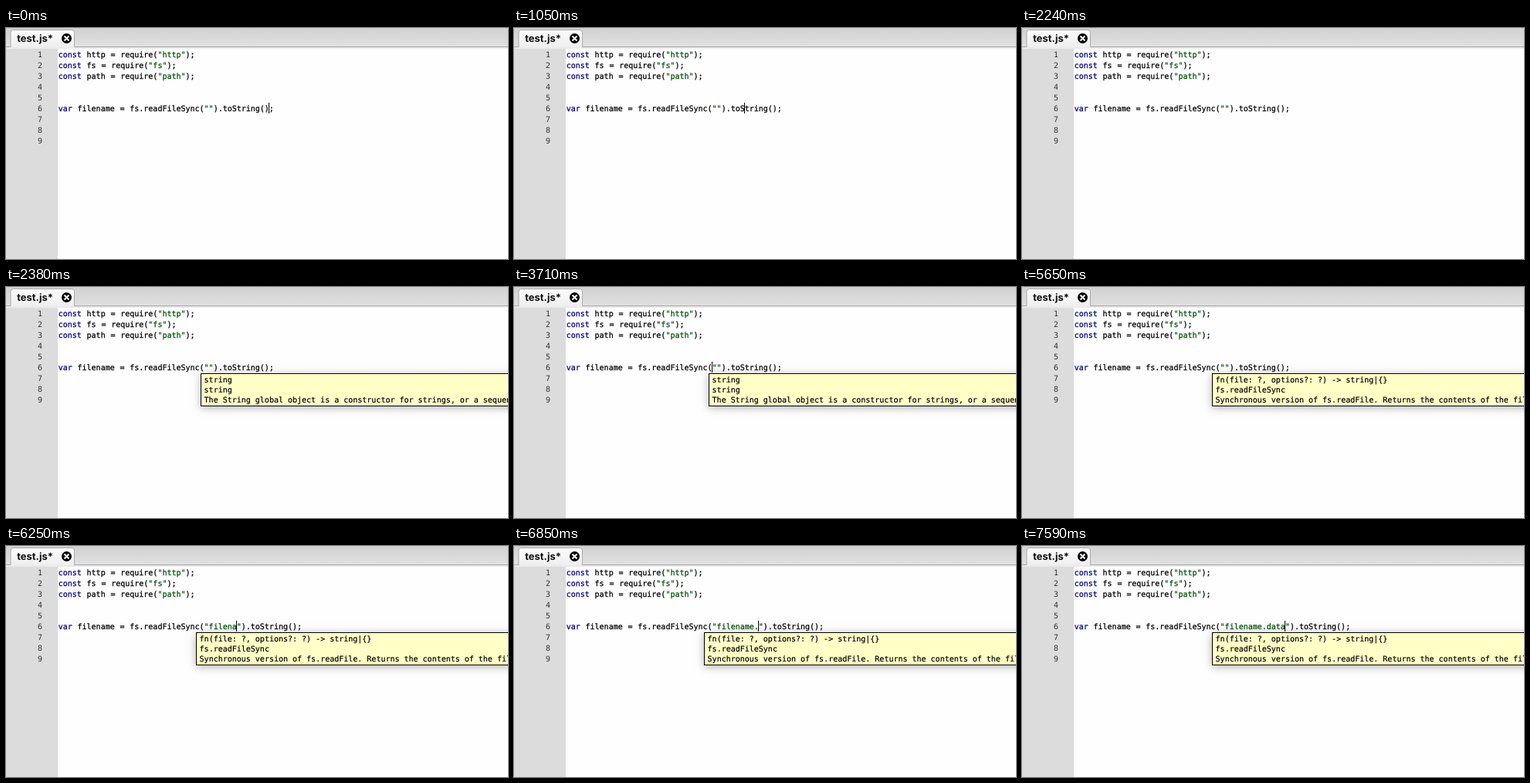
Write an HTML page with a canvas that moves like this. It is 650x300 px and loops after 8000 ms.

```html
<!DOCTYPE html>
<html lang="en">
<head>
<meta charset="utf-8">
<title>Code editor</title>
<style>
  html, body { margin: 0; width: 100%; height: 100%; overflow: hidden; background: #fff; }
  canvas { display: block; }
</style>
</head>
<body>
<canvas id="stage" width="650" height="300"></canvas>
<script>
const ctx = document.getElementById("stage").getContext("2d");
const W = 650, H = 300, LOOP = 8000;
const MONO = '10px "DejaVu Sans Mono", monospace';
const LABEL = 'bold 13px Inter, "Liberation Sans", sans-serif';
const CODE_X = 67.7, TOP = 27, ROW = 14;
const STEP = 150, BLINK = 440, START_COL = 45;
const TYPED = "filename.data", TYPE_AT = 5200, TYPE_COL = 32;

const CODE = [
  'const http = require("http");',
  'const fs = require("fs");',
  'const path = require("path");'
];

const STRING_TIP = {
  x: 252, at: 2380,
  lines: ["string", "string",
    "The String global object is a constructor for strings, or a sequence of characters."]
};
const READ_TIP = {
  x: 246, at: 4160,
  lines: ["fn(file: ?, options?: ?) -> string|{}", "fs.readFileSync",
    "Synchronous version of fs.readFile. Returns the contents of the filename."]
};

// Bursts of caret movement: start time, steps, columns covered
const BURSTS = [
  [450, 6, -11], [1340, 3, -3], [3710, 1, -1],
  [4750, 1, 1], [5050, 1, 1],
  [5650, 4, 6], [6250, 2, 2], [6700, 1, 1], [7290, 2, 4]
];

const clamp = (v, lo, hi) => Math.min(hi, Math.max(lo, v));

// The blink clock stands still while the first tooltip loads.
const blinkClock = t => t - clamp(t - STRING_TIP.at + 140, 0, 140);

function caretAt(t) {
  let col = START_COL, moved = 0;
  for (const [start, steps, cols] of BURSTS) {
    const k = clamp(Math.floor((t - start) / STEP), 0, steps);
    col += Math.round(cols * k / steps);
    if (k) moved = start + k * STEP;
  }
  const idle = blinkClock(t) - blinkClock(moved);
  return { col, visible: Math.floor(idle / BLINK) % 2 === 0 };
}

function rect(x, y, w, h, color) {
  ctx.fillStyle = color;
  ctx.fillRect(x, y, w, h);
}

function fade(h, from, to) {
  const g = ctx.createLinearGradient(0, 0, 0, h);
  g.addColorStop(0, from);
  g.addColorStop(1, to);
  return g;
}

function setFont(font, gap = 0) {
  ctx.font = font;
  ctx.textRendering = "geometricPrecision";
  ctx.wordSpacing = gap + "px";
}

function text(str, x, y, color, weight = 0) {
  ctx.fillStyle = ctx.strokeStyle = color;
  ctx.fillText(str, x, y);
  if (weight) {
    ctx.lineWidth = weight;
    ctx.strokeText(str, x, y);
  }
}

const codeX = (line, col) => CODE_X + ctx.measureText(line.slice(0, col)).width;

function codeLine(line, row) {
  setFont(MONO, 0.75);
  for (const m of line.matchAll(/"[^"]*"|\b(?:const|var)\b|[^\s"]+/g)) {
    const token = m[0];
    const color = token[0] === '"' ? "#00500a"
      : /^(const|var)$/.test(token) ? "#000080" : "#000";
    text(token, codeX(line, m.index), TOP + row * ROW + 11, color, 0.25);
  }
}

function tab() {
  ctx.beginPath();
  ctx.moveTo(6, 25);
  ctx.lineTo(6, 6);
  ctx.quadraticCurveTo(6, 2.5, 9.5, 2.5);
  ctx.lineTo(85, 2.5);
  ctx.quadraticCurveTo(88.5, 2.5, 88.5, 6);
  ctx.lineTo(88.5, 25);
  ctx.fillStyle = fade(TOP, "#fdfdfd", "#ededed");
  ctx.fill();
  ctx.strokeStyle = "#aaa";
  ctx.lineWidth = 1;
  ctx.stroke();
  setFont(LABEL);
  text("test.js*", 14.2, 18, "#111");

  ctx.beginPath();
  ctx.arc(78.5, 13.5, 6.5, 0, Math.PI * 2);
  ctx.fillStyle = "#000";
  ctx.fill();
  ctx.beginPath();
  for (const s of [-3, 3]) {
    ctx.moveTo(75.5, 13.5 - s);
    ctx.lineTo(81.5, 13.5 + s);
  }
  ctx.strokeStyle = "#fff";
  ctx.lineWidth = 2;
  ctx.stroke();
}

function tooltip({ x, lines }) {
  ctx.save();
  ctx.shadowColor = "rgba(0,0,0,.3)";
  ctx.shadowBlur = 10;
  ctx.shadowOffsetY = 2;
  rect(x, 112, W - x + 20, 43, "#000");
  ctx.restore();
  rect(x + 1, 113, W - x, 41, "#ffffc6");
  setFont(MONO);
  lines.forEach((line, i) => text(line, x + 4.6, 124 + i * 13, "#000", 0.2));
}

function frame() {
  rect(0, 0, W, H, "#fefefe");
  rect(0, TOP, 67, H - TOP, "#dcdcdc");
  rect(0, 0, W, 24, fade(24, "#d1d1d1", "#e0e0e0"));
  rect(0, 24, W, 1, "#a8a8a8");
  rect(0, 25, W, 2, "#eaeaea");
  tab();
  setFont(MONO);
  for (let n = 1; n <= 9; n++) text(String(n), 41, TOP + n * ROW - 3, "#333");
}

function draw(t) {
  const { col, visible } = caretAt(t);
  const typed = t >= TYPE_AT ? TYPED.slice(0, col - TYPE_COL) : "";
  const line = `var filename = fs.readFileSync("${typed}").toString();`;

  frame();
  CODE.forEach(codeLine);
  codeLine(line, 5);
  if (visible) rect(Math.floor(codeX(line, col)), TOP + 5 * ROW, 1, ROW, "#000");

  const tip = [READ_TIP, STRING_TIP].find(p => t >= p.at);
  if (tip) tooltip(tip);
}

const start = performance.now();
function tick() {
  draw((performance.now() - start) % LOOP);
  requestAnimationFrame(tick);
}
tick();
</script>
</body>
</html>
```
